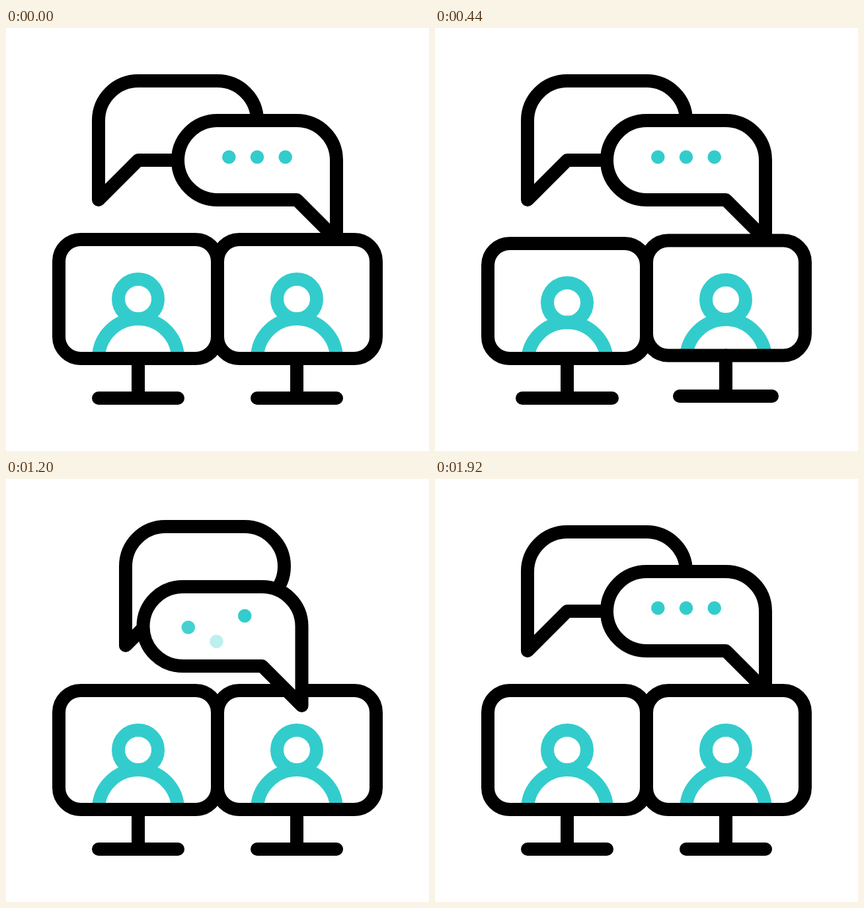
An HTML page that plays this animation: 640x640 px, repeating every 2000 ms.

```html
<!DOCTYPE html>
<html lang="en">
<head>
<meta charset="utf-8">
<title>Video chat</title>
<style>
  html, body { margin: 0; width: 100%; height: 100%; overflow: hidden; background: #fff; }
  svg { display: block; width: 100vw; height: 100vh; }
  .ink { fill: none; stroke: #000; stroke-width: 20; stroke-linecap: round; stroke-linejoin: round; }
  .bubble { fill: #fff; }
  .person { fill: none; stroke: #3cc; stroke-width: 20; }
  .dot { fill: #3cc; }
</style>
</head>
<body>
<svg viewBox="0 0 640 640">
  <defs>
    <g id="user">
      <circle cy="410" r="30"/>
      <path d="M-60 500a60 60 0 0 1 120 0"/>
    </g>
  </defs>
  <g class="monitor" transform="translate(200)">
    <use href="#user" class="person"/>
    <rect class="ink" x="-120" width="240" rx="33"/>
    <path class="ink"/>
  </g>
  <g class="monitor" transform="translate(440)">
    <use href="#user" class="person"/>
    <rect class="ink" x="-120" width="240" rx="33"/>
    <path class="ink"/>
  </g>
  <path id="back" class="ink bubble" d="M140 260V140a60 60 0 0 1 60-60H320a60 60 0 0 1 0 120H200Z"/>
  <path id="front" class="ink bubble" d="M500 320V200a60 60 0 0 0-60-60H320a60 60 0 0 0 0 120H440Z"/>
  <circle class="dot" cx="337.3" cy="195.3" r="10.3"/>
  <circle class="dot" cx="380" cy="195.3" r="10.3"/>
  <circle class="dot" cx="422.7" cy="195.3" r="10.3"/>
</svg>
<script>
const LOOP = 2000, STEP = 40, POSE_GAP = 80;

// Hop poses, evenly spaced: shifts of screen top, screen bottom, foot and user, then half the foot's length
const hop = [
  [0, 0, 0, 0, 60],
  [2, 0, 0, 1, 62],
  [-27, -25, -19, -30, 55],
  [-41, -39, -30.5, -45, 51],
  [-24, -26, -20, -27, 58],
  [1.5, -4.5, -3, 1, 70],
  [6, 0, 0, 5.5, 68],
  [1, 0, 0, 1, 62],
  [0, 0, 0, 0, 60]
];

const all = s => [...document.querySelectorAll(s)];
const monitors = all('.monitor'), dots = all('.dot');
const [back] = all('#back'), [front] = all('#front');

const clamp = x => Math.min(1, Math.max(0, x));
const ease = x => { x = clamp(x); return x * x * (3 - 2 * x); };
const move = (el, x, y) => el.setAttribute('transform', `translate(${x} ${y})`);

function spline(a, b, c, d, u) {
  return b + u / 2 * (c - a + u * (2 * a - 5 * b + 4 * c - d + u * (3 * (b - c) + d - a)));
}

function hopPose(t) {
  if (t <= 0) return hop[0];
  const x = (t + 40) / POSE_GAP, i = Math.floor(x);
  const at = k => hop[Math.min(hop.length - 1, Math.max(0, k))];
  return hop[0].map((_, n) => spline(at(i - 1)[n], at(i)[n], at(i + 1)[n], at(i + 2)[n], x - i));
}

function drawMonitor(el, t) {
  const [top, bottom, foot, user, half] = hopPose(t);
  const [person, screen, stand] = el.children;
  move(person, 0, user);
  screen.setAttribute('y', 320 + top);
  screen.setAttribute('height', 180 + bottom - top);
  stand.setAttribute('d', `M0 ${500 + bottom}V${560 + foot}M${-half} ${560 + foot}H${half}`);
}

// Each dot drifts up and fades, then rises again from below
function wave(p) {
  p = clamp(p);
  if (p < .5) return [-23 * ease(p * 2), 1 - clamp(p * 4 - 1)];
  const q = p * 2 - 1;
  return [28 * (1 - ease(q)), .91 * clamp(q * 2 + .15)];
}

function draw(t) {
  monitors.forEach((el, i) => drawMonitor(el, t - i * 80));

  const home = ease((t - 1680) / 240);
  const away = start => ease((t - start) / 240) * (1 - home);
  const f = away(456), b = away(600), d = away(472);
  move(front, -52.5 * f, 23 * f);
  move(back, 41 * b, -8 * b);
  dots.forEach((el, i) => {
    const [rise, alpha] = wave((t - 860 - i * 120) / 400);
    move(el, -61.5 * d, 23.2 * d + rise);
    el.setAttribute('opacity', alpha + (1 - alpha) * home);
  });
}

const begin = performance.now();
function tick() {
  const t = (performance.now() - begin) % LOOP;
  draw(Math.floor(t / STEP) * STEP);
  requestAnimationFrame(tick);
}
tick();
</script>
</body>
</html>
```
